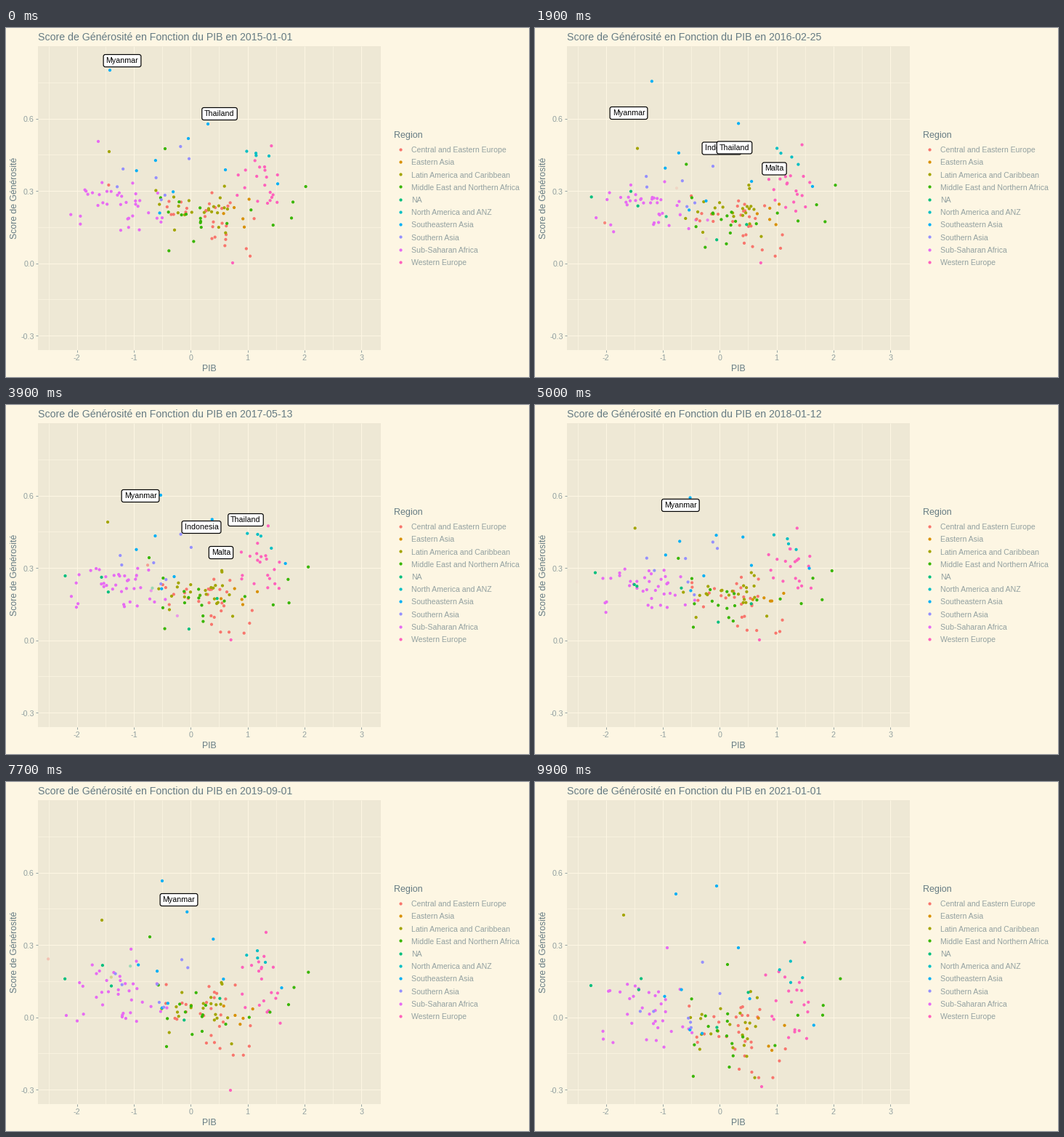
These frames come from a looping animation (720x480 px, 10000 ms). A matplotlib script:

```python
import matplotlib.pyplot as plt
import numpy as np
from matplotlib.animation import FuncAnimation
from matplotlib.colors import to_rgb
from matplotlib.patches import Rectangle

W, H, DPI = 720, 480, 80
PX = 72 / DPI
FRAMES, INTERVAL = 100, 100
LAST = FRAMES - 1
YEAR = LAST / 6                                  # frames per year
YEARS = np.arange(7)[:, None]
AFTER = np.clip(YEARS - 4, 0, 1)                 # scores drop after 2019

PAPER, PANEL, INK, FAINT = "#fdf6e3", "#eee8d5", "#657b83", "#93a1a1"
REGIONS = {
    "Central and Eastern Europe": "#F8766D",
    "Eastern Asia": "#D89000",
    "Latin America and Caribbean": "#A3A500",
    "Middle East and Northern Africa": "#39B600",
    "NA": "#00BF7D",
    "North America and ANZ": "#00BFC4",
    "Southeastern Asia": "#00B0F6",
    "Southern Asia": "#9590FF",
    "Sub-Saharan Africa": "#E76BF3",
    "Western Europe": "#FF62BC",
}
COLORS = [to_rgb(c) for c in REGIONS.values()]
CEE, EAST, LATIN, MENA, NA, ANZ, SEA, SOUTH, AFRICA, WEST = range(10)

rng = np.random.default_rng(15)


def to_px(x, y):
    return np.stack([254.3 + 78.3 * x, 323.7 - 331.8 * y], axis=-1)


def lerp(times, keys, f):
    i = int(np.clip(np.searchsorted(times, f, "right") - 1, 0, len(times) - 2))
    u = np.clip((f - times[i]) / (times[i + 1] - times[i]), 0, 1)
    return keys[i] * (1 - u) + keys[i + 1] * u


def path(*stops):
    """Straight path through (frame, x, y) stops, in pixels."""
    stops = np.array(stops, float)
    return stops[:, 0], stops[:, 1:]


# ---- point layers: (times, keys[time, point, xy], region, alpha(f)) ----
layers = []


def solid(f):
    return 1


def add(region, x, y, drop, sd=0, alpha=solid):
    """Points that wander a little each year and sink by `drop` after 2019."""
    size = (7, len(x))
    x = np.array(x) + rng.normal(0, 0.06, size)
    y = (np.array(y) - 0.01 * YEARS - drop * AFTER
         + (1 + 0.6 * AFTER) * (sd + rng.normal(0, 0.018, size)))
    y = np.maximum(y, 0.03 - 0.28 * AFTER)
    layers.append((YEARS[:, 0] * YEAR, to_px(x, y), region, alpha))


def cloud(region, n, cx, sx, level, sd, drop, slope=0):
    zx, zy = rng.normal(size=(2, n)).clip(-1.9, 1.9)
    add(region, cx + sx * zx, level + slope * sx * zx, drop, sd * zy)


def lone(region, *stops):
    times, keys = path(*stops)
    layers.append((times, keys[:, None], region, solid))


def ghost(year):
    """A few points that fade in and out around one year."""
    for region in rng.choice([CEE, LATIN, NA, AFRICA, AFRICA], 3):
        spot = to_px(rng.normal(-0.9, 0.6, 1), rng.normal(0.22, 0.07, 1))
        layers.append((np.array([0, LAST]), np.array([spot, spot]), region,
                       lambda f: max(0, 1 - abs(f / YEAR - year))))


cloud(AFRICA, 35, -1.3, 0.44, 0.24, 0.048, 0.16)
cloud(CEE, 28, 0.35, 0.42, 0.18, 0.055, 0.20, -0.05)
cloud(LATIN, 21, 0.12, 0.36, 0.21, 0.055, 0.23)
cloud(MENA, 14, 0.2, 0.42, 0.19, 0.06, 0.20)
cloud(EAST, 5, 0.6, 0.4, 0.21, 0.07, 0.20, 0.1)
cloud(WEST, 20, 1.16, 0.22, 0.33, 0.08, 0.21, 0.1)

add(MENA, [2.05, 1.8, 1.75, 1.4], [0.33, 0.27, 0.18, 0.17], 0.12)
add(ANZ, [1.0, 1.2, 1.2, 1.36], [0.48, 0.46, 0.44, 0.41], 0.22)
add(SEA, [-0.95, -0.63, 0.6, 1.68, -0.35, -0.52],
    [0.41, 0.43, 0.36, 0.33, 0.27, 0.22], 0.24)
add(SOUTH, [-0.18, -0.03, -1.3, -1.2, -0.62, -0.5, -0.47],
    [0.48, 0.41, 0.37, 0.33, 0.34, 0.27, 0.27], 0.25)
add(NA, [-2.2, -1.5, -1.45, 0.5, -0.06], [0.28, 0.31, 0.25, 0.2, 0.09], 0.08,
    alpha=lambda f: min(1, f / YEAR))

# countries far from their region's crowd
lone(SEA, (0, 143, 58), (11, 140, 53), (39, 213, 124), (77, 215, 136), (LAST, 194, 154))
lone(SEA, (0, 278, 132), (27, 281, 131), (62, 289, 208), (LAST, 280, 228))
lone(SEA, (0, 251, 152), (70, 249, 190), (LAST, 250, 143))
lone(LATIN, (0, 142, 170), (39, 140, 161), (77, 132, 190), (LAST, 122, 183))
lone(MENA, (0, 219, 166), (39, 197, 210), (77, 198, 213), (LAST, 265, 251))
lone(AFRICA, (0, 127, 156), (YEAR, 145, 235), (LAST, 182, 228))
lone(WEST, (0, 312, 323), (4 * YEAR, 308, 323), (77, 309, 424), (LAST, 312, 419))

for year in range(5):
    ghost(year)

# ---- country labels: name, first and last frame, path of the centre ----
LABELS = [
    ("Malta", 1, 49, path((11, 323, 192), (27, 336, 195), (39, 296, 203))),
    ("Indonesia", 1, 49, path((11, 233, 130), (27, 281, 201), (39, 269, 168))),
    ("Thailand", 0, 49, path((0, 294, 118), (11, 263, 158), (27, 286, 171),
                             (39, 330, 158))),
    ("Myanmar", 0, 82, path((0, 160, 45), (11, 123, 103), (27, 135, 131),
                            (39, 185, 125), (62, 217, 152), (77, 238, 162))),
]

# ---- stage ----
plt.rcParams["font.family"] = "Liberation Sans"
fig = plt.figure(figsize=(W / DPI, H / DPI), dpi=DPI, facecolor=PAPER)
ax = fig.add_axes([0, 0, 1, 1])
ax.set(xlim=(0, W), ylim=(H, 0))
ax.axis("off")

L, T, R, B = 44, 25, 516, 443
panel = ax.add_patch(Rectangle((L, T), R - L, B - T, fc=PANEL, lw=0, zorder=0))


def line(x, y, color, width):
    ax.plot(x, y, color=color, lw=width * PX, solid_capstyle="butt", zorder=1)


def write(x, y, s, size, color, **kw):
    return ax.text(x, y, s, fontsize=size * PX, color=color, **kw)


for k in range(-5, 7):
    x = to_px(k / 2, 0)[0]
    major = k % 2 == 0
    line([x, x], [T, B], PAPER, 1.1 if major else 0.7)
    if major:
        line([x, x], [B, B + 3], FAINT, 1)
        write(x, 457, str(k // 2), 10.8, FAINT, ha="center")

for k in range(-2, 6):
    y = to_px(0, 0.15 * k)[1]
    major = k % 2 == 0
    line([L, R], [y, y], PAPER, 1.1 if major else 0.7)
    if major:
        line([L - 3, L], [y, y], FAINT, 1)
        write(39, y + 4.5, f"{0.15 * k:.1f}", 10.8, FAINT, ha="right")

title = write(44, 17, "", 14.2, INK)
write(279.5, 472, "PIB", 12.3, INK, ha="center")
write(12, 234, "Score de Générosité", 12.2, INK, ha="center", va="center", rotation=90)
write(534, 151, "Region", 12.5, INK)

DOT = (4.2 * PX) ** 2
for i, name in enumerate(REGIONS):
    y = 166.5 + 17.25 * i
    ax.scatter(543, y, s=DOT, color=COLORS[i], lw=0)
    write(558, y + 4.5, name, 10.5, FAINT)

dots = ax.scatter([], [], s=DOT, lw=0, zorder=3)
dots.set_clip_path(panel)

tags = [
    write(0, 0, name, 10.6, "black", ha="center", va="center", zorder=5,
          bbox=dict(boxstyle="round,pad=0.33,rounding_size=0.25",
                    fc="white", ec="black", lw=1.2 * PX))
    for name, *_ in LABELS
]


def update(f):
    day = np.datetime64("2015-01-01") + int(2192 * f / LAST)
    title.set_text(f"Score de Générosité en Fonction du PIB en {day}")

    spots, colors = [], []
    for times, keys, region, alpha in layers:
        xy = lerp(times, keys, f)
        spots.append(xy)
        colors += [(*COLORS[region], alpha(f))] * len(xy)
    dots.set_offsets(np.concatenate(spots))
    dots.set_facecolors(colors)

    for tag, (_, first, last, (times, keys)) in zip(tags, LABELS):
        tag.set_visible(first <= f <= last)
        tag.set_position(lerp(times, keys, f))
    return [title, dots, *tags]


anim = FuncAnimation(fig, update, frames=FRAMES, interval=INTERVAL,
                     repeat=True, repeat_delay=0, blit=False)
plt.show()
```
